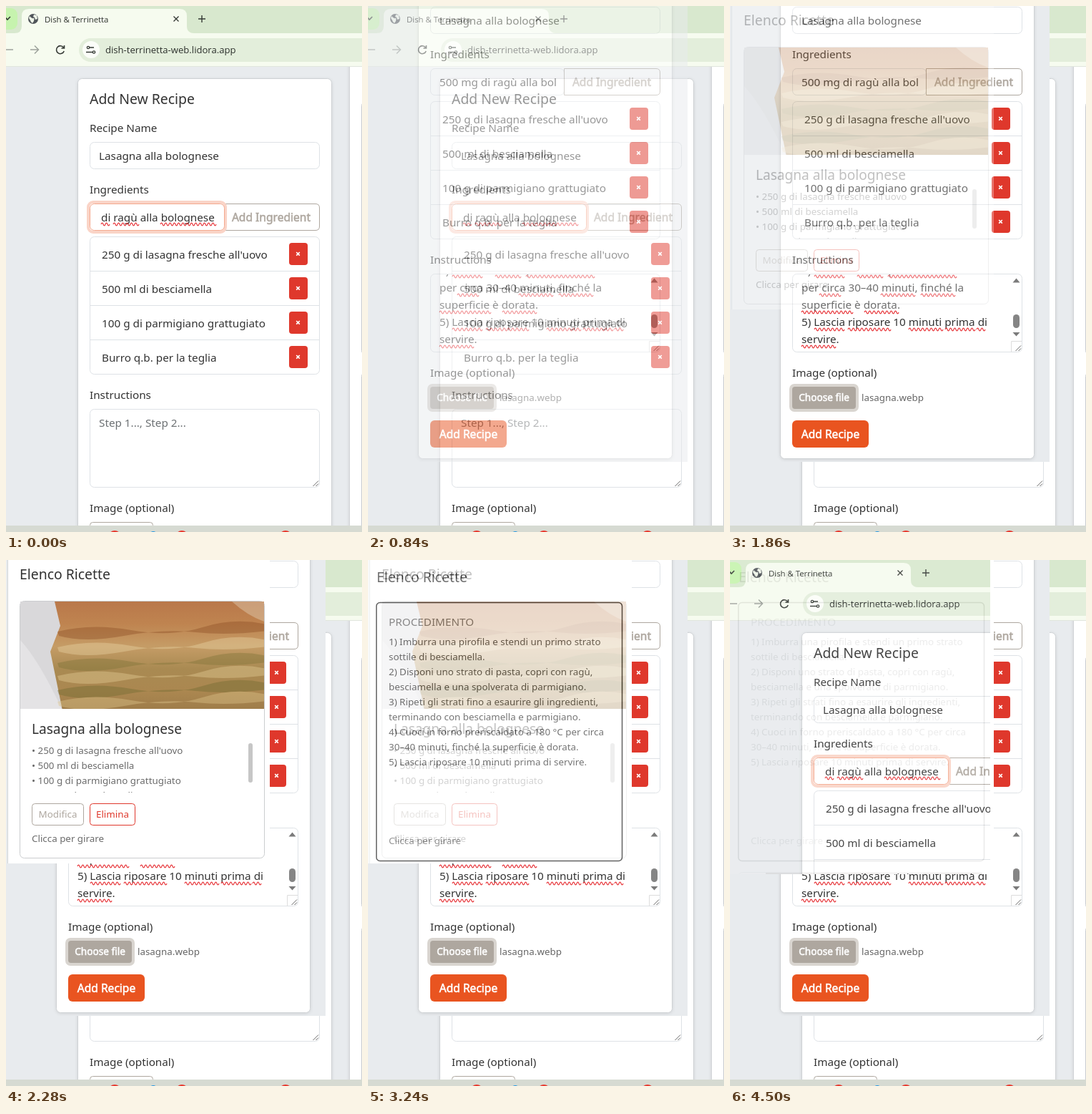
An HTML page for the animation above (4560 ms loop, 498 by 735 pixels).

```html
<!DOCTYPE html>
<html lang="en">
<head>
<meta charset="utf-8">
<title>Recipe form</title>
<style>
html, body { margin: 0; width: 100%; height: 100%; overflow: hidden; }
#stage { display: block; width: 498px; height: 735px; font-family: "Noto Sans", "Open Sans", sans-serif; }
#stage text { white-space: pre; }
.chrome { font-family: "Open Sans", "Noto Sans", sans-serif; }
.shadow { filter: drop-shadow(0 1px 2px rgba(0, 0, 0, .1)); }
</style>
</head>
<body>
<svg id="stage" viewBox="0 0 498 735"></svg>
<script>
const PAGE = '#e8ebee', INK = '#333', LINE = '#dee2e6', TAUPE = '#aea79f', RED = '#df382c', ORANGE = '#e95420';
const FONT_SCALE = 0.955;

const rect = (x, y, w, h, fill, stroke = 'none', rx = 0, sw = 1) =>
  `<rect x="${x}" y="${y}" width="${w}" height="${h}" fill="${fill}" stroke="${stroke}" stroke-width="${sw}" rx="${rx}"/>`;
const box = (x, y, w, h, stroke, rx = 6, fill = '#fff') => rect(x + .5, y + .5, w - 1, h - 1, fill, stroke, rx);
const text = (x, y, str, size = 16, fill = INK, extra = '') =>
  `<text x="${x}" y="${y}" font-size="${size * FONT_SCALE}" fill="${fill}" ${extra}>${str}</text>`;
const centred = (x, y, str, size, fill, extra = '') => text(x, y, str, size, fill, 'text-anchor="middle" ' + extra);
// Medium weight: regular letters with a thin outline.
const medium = (x, y, str, size, fill) => centred(x, y, str, size * 1.02, fill, `stroke="${fill}" stroke-width=".55"`);
const path = (d, stroke, sw = 1, fill = 'none') => `<path d="${d}" stroke="${stroke}" stroke-width="${sw}" fill="${fill}"/>`;
const dot = (x, y, r, fill) => `<circle cx="${x}" cy="${y}" r="${r}" fill="${fill}"/>`;
const clip = (x, y, w, h, body) =>
  `<svg x="${x}" y="${y}" width="${w}" height="${h}" viewBox="${x} ${y} ${w} ${h}">${body}</svg>`;
const squiggles = (y, ...spans) => spans.map(([a, b]) =>
  path(`M${a} ${y}` + 'q1.5 -4 3 0t3 0'.repeat(Math.round((b - a) / 6)), '#e5252a', 1.1)).join('');

const items = ["250 g di lasagna fresche all'uovo", '500 ml di besciamella', '100 g di parmigiano grattugiato', 'Burro q.b. per la teglia'];

function ingredientList() {
  return box(117, 322, 322, 193, LINE) + items.map((item, i) => {
    const y = 322 + 48 * i;
    return (i ? path(`M117 ${y + .5}H439`, LINE) : '') +
      text(134, y + 31, item) + rect(396, y + 9, 26, 31, RED, 'none', 4) +
      path(`M406.2 ${y + 22}l4.6 4.6m0 -4.6l-4.6 4.6`, '#fff', 1.7);
  }).join('');
}

function steps() {
  return clip(118, 564, 320, 108,
    text(130, 564, '4) Cuoci in forno preriscaldato') + squiggles(567, [148, 188], [208, 243], [251, 347]) +
    text(130, 588, 'per circa 30–40 minuti, finché la') + squiggles(593, [155, 187], [241, 289], [297, 342]) +
    text(130, 612, 'superficie è dorata.') + squiggles(617, [130, 202], [218, 266]) +
    text(130, 636, '5) Lascia riposare 10 minuti prima di') +
    squiggles(641, [148, 190], [195, 254], [280, 327], [331, 371], [375, 389]) +
    text(130, 660, 'servire.') + squiggles(665, [130, 178])) +
    path('M425.5 575.5l5 -6 5 6zM425.5 645l5 5.5 5 -5.5z', 'none', 0, '#7b7b7b') +
    rect(426, 620, 9, 19, '#858585', 'none', 4.5) + path('M423.5 672.5V657.5H438', '#dcdcdc');
}

function form(filled) {
  const group = filled
    ? box(117, 276, 188, 38, LINE) + text(130, 301, '500 mg di ragù alla bol')
    : rect(115, 274, 192, 42, '#fff', '#fad4c7', 7, 4) + box(117, 276, 189, 38, '#f4aa90') +
      text(133, 301, 'di ragù alla bolognese') + squiggles(305, [133, 146], [150, 183], [216, 292]);
  const edge = filled ? 304.5 : 305.5;
  const addButton = path(`M${edge} 276.5H433q5.5 0 5.5 5.5V308q0 5.5 -5.5 5.5H${edge}z`, TAUPE, 1, '#fff') +
    medium(371, 301, 'Add Ingredient', 16, TAUPE);
  const file = filled
    ? rect(113, 717, 97, 39, '#d9d5d0', 'none', 7) + rect(117, 721, 89, 31, TAUPE, 'none', 4) +
      medium(161.5, 741, 'Choose file', 14, '#fff') + text(214, 741, 'lasagna.webp', 14, '#666')
    : box(117, 721, 89, 31, TAUPE, 4);
  return `<g class="shadow">${box(100, 101, 356, 721, '#cfd2d5')}</g>` +
    text(117, 137, 'Add New Recipe', 20.3) + text(117, 176, 'Recipe Name') +
    box(117, 190, 322, 38, LINE) + text(130, 215, 'Lasagna alla bolognese') +
    text(117, 262, 'Ingredients') + (filled ? group + addButton : addButton + group) + ingredientList() +
    text(117, 549, 'Instructions') + box(117, 563, 322, 110, LINE) +
    (filled ? steps() : text(130, 588, 'Step 1..., Step 2...', 16, '#6c7073')) +
    path('M429.5 671l7.5 -7.5m-3.5 7.5l3.5 -3.5', '#666') +
    text(117, 707, 'Image (optional)') + file +
    rect(117, 768, 107, 38, ORANGE, 'none', 6) + medium(170.5, 793, 'Add Recipe', 16, '#fff');
}

function browserBar() {
  const paper = '#f6fbef', dark = '#353a35', pale = '#9ea39d';
  const knob = (x, y) => `<circle cx="${x}" cy="${y}" r="1.7" fill="none" stroke="${dark}" stroke-width="1.3"/>`;
  return rect(0, 0, 498, 38, '#d8e8ce') + rect(-14, 3, 30, 30, '#c6f3ae', 'none', 9) +
    path('M-1 16l3 3 4 -4', dark, 1.6) +
    path('M12 38q10 0 10 -10V14q0 -10 10 -10H243q10 0 10 10V28q0 10 10 10z', 'none', 0, paper) +
    rect(0, 38, 498, 47, paper) + rect(102, 45, 420, 33, '#e3eedb', 'none', 16.5) +
    dot(38, 18, 7, '#50555a') +
    path('M33 14q3 4 5 3t1 4l-2 3q-3 -2 -3 -4l-2 -3zM39 12l4 1 1 5 -3 1 -1 -3 -2 -1z', 'none', 0, '#eef4e8') +
    path('M234.5 14.5l7 7m0 -7l-7 7M269 18h10m-5 -5v10', dark, 1.4) +
    path('M10 61H-1M34 61h11m-5 -5.5l5.5 5.5 -5.5 5.5', pale, 1.5) +
    path('M80.5 58a5.5 5.5 0 1 0 .7 5M81.5 55v4h-4', dark, 1.6) +
    dot(119, 61, 12, '#fbfdf8') +
    path('M117 58h6M112 64.5h9', dark, 1.4) + knob(115, 58) + knob(123, 64.5) +
    `<g class="chrome">${text(54, 23, 'Dish &amp; Terrinetta', 11.9, '#2c302c')}` +
    `${text(139, 66, 'dish-terrinetta-web.lidora.app', 13.7, '#2c302c')}</g>` +
    path('M0 84.5H498', '#e0e5dd');
}

function home() {
  return rect(0, 0, 498, 735, PAGE) + form(false) +
    `<g class="shadow">${box(480, 70, 40, 800, '#d0d3d6', 0)}</g>` +
    box(497, 133, 40, 355, '#c9cccf') + box(497, 511, 40, 300, '#c9cccf') + browserBar() +
    rect(0, 726, 498, 9, '#d6dad2') +
    dot(152, 742, 9, '#e8372c') + dot(206, 740, 6, '#2196e3') + dot(246, 742, 9, '#e8372c') + dot(391, 742, 9, '#e8372c');
}

function photo() {
  const tones = ['#b9784a', '#bf8450', '#c59c66', '#a98a52', '#ab8750', '#9c7a48'];
  const stops = tones.map((tone, i) => `<stop offset="${i / (tones.length - 1)}" stop-color="${tone}"/>`).join('');
  const layer = (y, fill) =>
    path(`M72 ${y + 6}Q120 ${y - 6} 175 ${y + 4}T275 ${y}T365 ${y - 4}v9Q310 ${y + 12} 265 ${y + 7}T165 ${y + 12}T74 ${y + 12}z`, 'none', 0, fill);
  return `<linearGradient id="bake" x2="0" y2="1">${stops}</linearGradient>` +
    clip(20, 58, 341, 150,
      rect(20, 58, 341, 150, '#d9d8da') + path('M20 112Q46 140 78 208H20z', 'none', 0, '#e4e3e5') +
      path('M68 58H361V215H80L62 128 76 92z', 'none', 0, 'url(#bake)') +
      `<g opacity=".4">${path('M316 58H361V86Q338 78 316 58z', 'none', 0, '#e6d8c0')}` +
      layer(94, '#8c4d24') + layer(116, '#ead5a5') + layer(138, '#7e7337') + layer(156, '#e6cf98') +
      layer(176, '#6f6a30') + layer(192, '#e0c78d') + '</g>');
}

function recipeCard() {
  const grey = '#6b6b6b';
  const button = (x, w, label, color) => box(x, 340, w, 31, color, 4) + centred(x + w / 2, 360, label, 14, color);
  return rect(0, 0, 369, 424, '#fff') + rect(0, 0, 2, 424, PAGE) + path('M2.5 0V424', '#d3d6d8') +
    text(19, 27, 'Elenco Ricette', 20.3) + box(19, 57, 343, 360, '#cbcdcf') + photo() +
    text(36, 242.5, 'Lasagna alla bolognese', 20) +
    clip(30, 255, 300, 70, items.map((item, i) => text(36, 271 + 21 * i, '• ' + item, 14, grey)).join('')) +
    rect(339, 256, 6, 55, '#c6c6c6', 'none', 3) +
    button(36, 73, 'Modifica', TAUPE) + button(117, 64, 'Elimina', RED) +
    text(36, 394, 'Clicca per girare', 14, grey);
}

function cardBack() {
  const lines = ['1) Imburra una pirofila e stendi un primo strato', 'sottile di besciamella.',
    '2) Disponi uno strato di pasta, copri con ragù,', 'besciamella e una spolverata di parmigiano.',
    '3) Ripeti gli strati fino a esaurire gli ingredienti,', 'terminando con besciamella e parmigiano.',
    '4) Cuoci in forno preriscaldato a 180 °C per circa', '30–40 minuti, finché la superficie è dorata.',
    '5) Lascia riposare 10 minuti prima di servire.'];
  return rect(0, 0, 364, 439, '#fff') + text(12, 31, 'Elenco Ricette', 20.3) +
    rect(11.75, 59.5, 343.75, 361, '#fff', '#222', 5, 1.5) + text(29, 92, 'PROCEDIMENTO', 16, '#666') +
    lines.map((line, i) => text(29, 119 + 21 * i, line, 14, '#3d3d3d')).join('') +
    text(29, 397, 'Clicca per girare', 14, '#666') +
    box(11, 436, 345, 20, '#bfbfbf') + rect(50, 437, 303, 4, '#70605a') + rect(210, 437, 60, 4, '#a9a09a');
}

const layer = (id, w, h, body) =>
  `<g id="${id}"><svg width="${w}" height="${h}">${body}</svg></g>`;
const stage = document.getElementById('stage');
stage.innerHTML = `<g id="home">${home()}</g>` +
  layer('filled', 447, 637, rect(0, 0, 447, 637, PAGE) + `<g transform="translate(-30 -189)">${form(true)}</g>`) +
  layer('card', 369, 424, recipeCard()) +
  layer('back', 364, 439, cardBack()) +
  layer('again', 364, 439, '<use href="#home"/>');

const LOOP = 4560, STEP = 60;
const fades = ['filled', 'card', 'back', 'again'].map((id, i) => ({ el: document.getElementById(id), start: 600 + 1140 * i }));
const backView = document.querySelector('#back > svg');

function draw(now) {
  const t = now % LOOP;
  for (const { el, start } of fades) {
    const k = Math.min(10, Math.max(0, Math.floor((t - start) / STEP) + 1)) / 10;
    el.setAttribute('opacity', k);
    el.setAttribute('visibility', k ? 'visible' : 'hidden');
    // The taller card back only shows its last rows once its fade is done.
    if (el.id === 'back') backView.setAttribute('height', k < 1 ? 424 : 439);
  }
  requestAnimationFrame(draw);
}
draw(performance.now());
</script>
</body>
</html>
```
